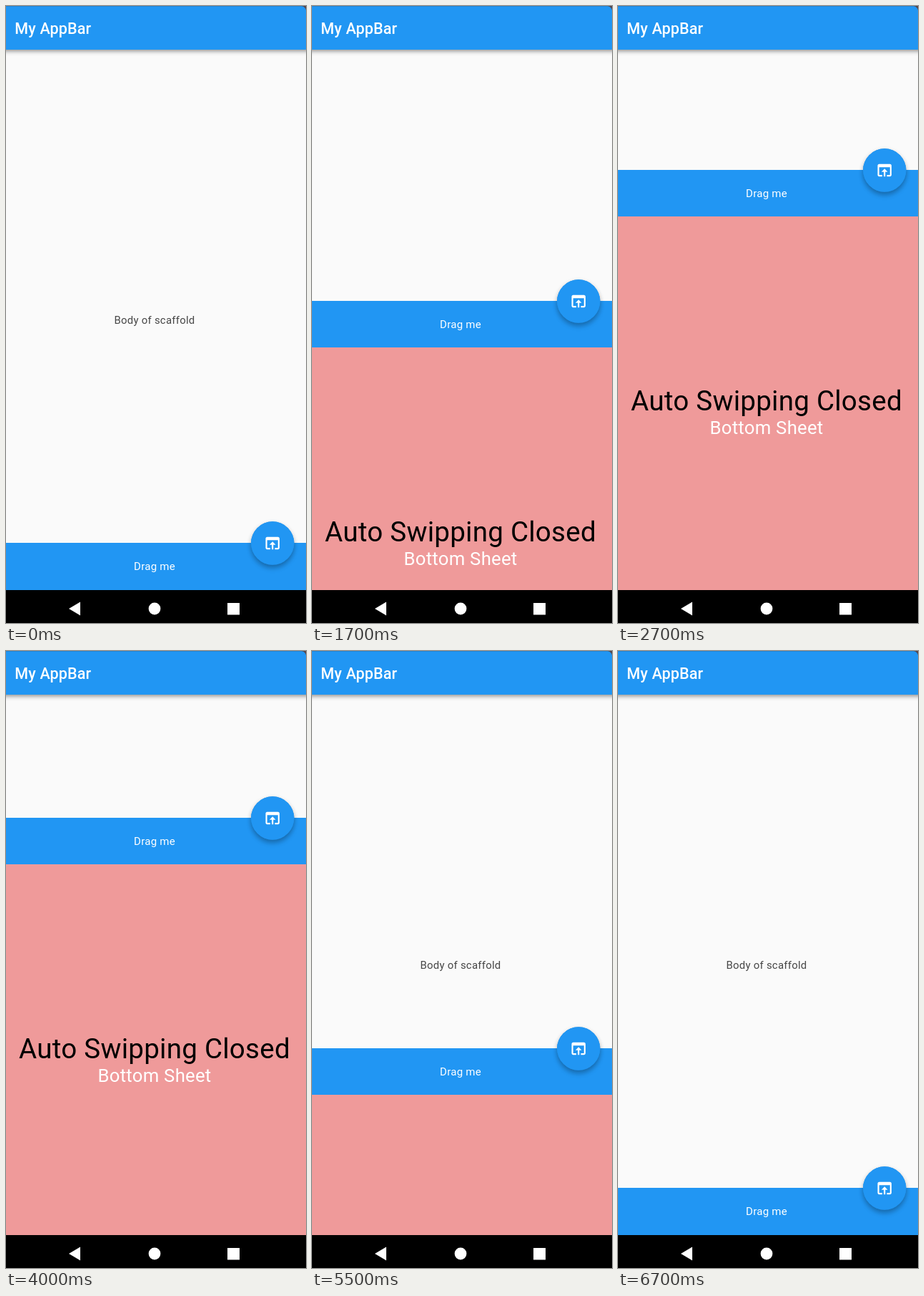
Recreate the animation shown at these times as an HTML page with a canvas. Size 420 by 862 pixels, loop 8.2 s.

```html
<!DOCTYPE html>
<html lang="en">
<head>
<meta charset="utf-8">
<title>Bottom sheet</title>
<style>
  html, body { margin: 0; width: 100%; height: 100%; overflow: hidden; background: #fafafa; }
  canvas { display: block; width: 420px; height: 862px; }
</style>
</head>
<body>
<canvas id="stage"></canvas>
<script>
const W = 420, H = 862, LOOP = 8200, STEP = 100;
const BLUE = '#2196f3', CENTER = 208, NAV_TOP = 816, BAR_H = 65;
const CLOSED = 750;

const canvas = document.getElementById('stage');
const ctx = canvas.getContext('2d');
const dpr = window.devicePixelRatio || 1;
canvas.width = W * dpr;
canvas.height = H * dpr;

const easeOut = p => u => 1 - Math.pow(1 - u, p);
const easeBoth = k => u => u + k * (u * u * (3 - 2 * u) - u);

// Each drag: start time, end time, final top of the sheet, easing
const drags = [
  [900, 1800, 394, easeBoth(0.8)],
  [1800, 2200, 303, easeOut(1.5)],
  [2400, 2900, 207, easeOut(1.6)],
  [3900, 4400, 386, easeBoth(0.57)],
  [4600, 5100, 465, easeOut(2.6)],
  [5200, 5700, 568, easeOut(2.26)],
  [5800, 6400, 733, easeBoth(0.6)],
  [6500, 6700, CLOSED, easeOut(1.6)]
];

function sheetTop(t) {
  let y = CLOSED;
  for (const [start, end, to, ease] of drags) {
    if (t <= start) break;
    y += (to - y) * ease(Math.min(1, (t - start) / (end - start)));
  }
  return Math.round(y);
}

function rect(color, x, y, w, h) {
  ctx.fillStyle = color;
  ctx.fillRect(x, y, w, h);
}

function disc(color, x, y, r) {
  ctx.fillStyle = color;
  ctx.beginPath();
  ctx.arc(x, y, r, 0, Math.PI * 2);
  ctx.fill();
}

function text(str, x, y, size, color, align = 'center', weight = 400, spacing = 0.267) {
  ctx.font = `${weight} ${size}px Roboto, sans-serif`;
  ctx.letterSpacing = spacing + 'px';
  ctx.textAlign = align;
  ctx.fillStyle = color;
  ctx.fillText(str, x, y);
}

function withShadow(alpha, blur, dy, draw) {
  ctx.save();
  ctx.shadowColor = `rgba(0,0,0,${alpha})`;
  ctx.shadowBlur = blur * dpr;
  ctx.shadowOffsetY = dy * dpr;
  draw();
  ctx.restore();
}

const openIcon = new Path2D(
  'M19 4H5c-1.11 0-2 .9-2 2v12c0 1.1.89 2 2 2h4v-2H5V8h14v10h-4v2h4c1.1 0 2-.9 2-2V6' +
  'c0-1.1-.89-2-2-2zm-7 6l-4 4h3v6h2v-6h3l-4-4z');

function drawAppBar() {
  withShadow(0.45, 6, 2, () => rect(BLUE, -10, 0, W + 20, 61));
  rect('#2583cd', 0, 0, W, 1);
  ctx.fillStyle = '#54454a';
  ctx.beginPath();
  ctx.moveTo(414, 0);
  ctx.quadraticCurveTo(419, 1, W, 6);
  ctx.lineTo(W, 0);
  ctx.fill();
  text('My AppBar', 12.3, 38.5, 21.5, '#fff', 'left', 500, 0.16);
}

function drawFab(y) {
  const x = 373.2;
  withShadow(0.2, 7, 5, () => disc(BLUE, x, y + 0.5, 30.2));
  withShadow(0.14, 6, 2, () => disc(BLUE, x, y + 0.5, 30.2));
  ctx.save();
  ctx.translate(x, y + 0.5);
  ctx.scale(1.08, 1.08);
  ctx.translate(-12, -12);
  ctx.fillStyle = '#fff';
  ctx.fill(openIcon);
  ctx.restore();
}

function drawSheet(y) {
  rect('#ef9a9a', 0, y + BAR_H, W, H);
  text('Auto Swipping Closed', CENTER, y + 336, 38.5, '#000');
  text('Bottom Sheet', CENTER, y + 369, 25.7, '#fff');
  rect(BLUE, 0, y, W, BAR_H + (y === CLOSED ? 1 : 0));
  text('Drag me', CENTER, y + 38, 15, '#fff');
}

function drawNav() {
  rect('#000', 0, NAV_TOP, W, H - NAV_TOP);
  ctx.fillStyle = '#fff';
  ctx.beginPath();
  ctx.moveTo(88, 842);
  ctx.lineTo(104, 832.5);
  ctx.lineTo(104, 851.5);
  ctx.fill();
  disc('#fff', 208, 842, 8.4);
  rect('#fff', 310, 834, 17, 16.5);
}

function draw(t) {
  const y = sheetTop(t);
  ctx.setTransform(dpr, 0, 0, dpr, 0, 0);
  rect('#fafafa', 0, 0, W, H);
  text('Body of scaffold', CENTER, 443.5, 14.9, 'rgba(0,0,0,0.72)');
  drawAppBar();
  drawSheet(y);
  drawFab(y);
  drawNav();
}

const began = performance.now();
function tick() {
  const t = (performance.now() - began) % LOOP;
  draw(Math.floor(t / STEP) * STEP);
  requestAnimationFrame(tick);
}
tick();
</script>
</body>
</html>
```
